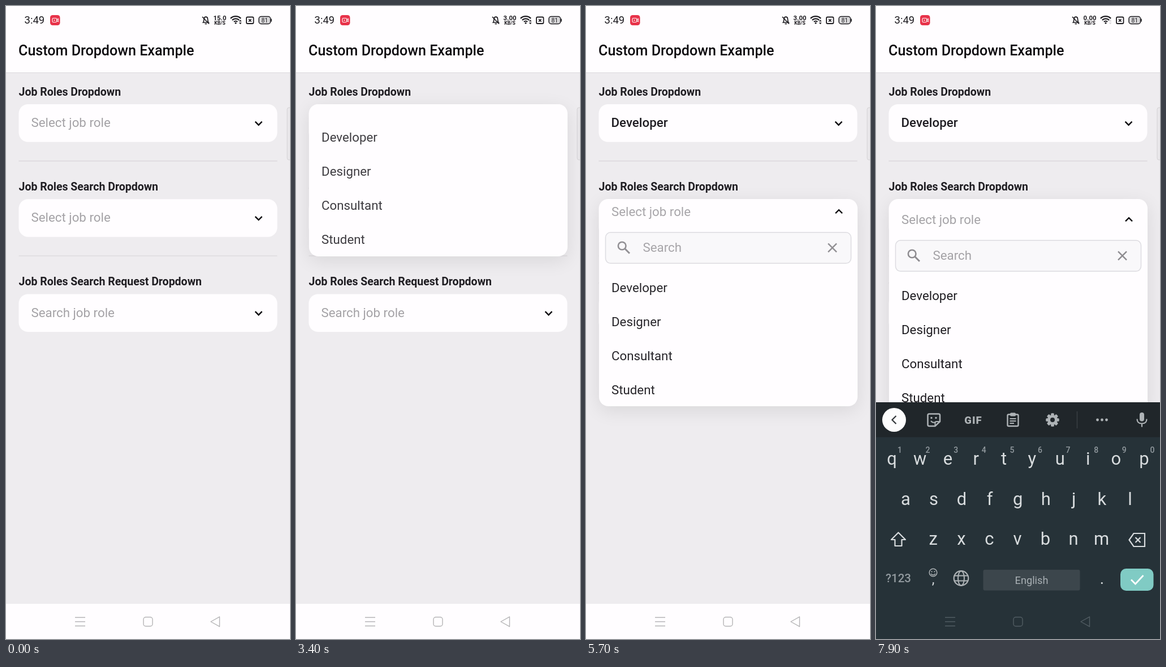
These frames come from a looping animation (502x1115 px, 8000 ms). An HTML page:

```html
<!DOCTYPE html>
<html lang="en">
<head>
<meta charset="utf-8">
<title>Custom Dropdown Example</title>
<style>
  html, body { margin: 0; width: 100%; height: 100%; overflow: hidden; background: #eeecef; }
  #stage { position: relative; width: 502px; height: 1115px; overflow: hidden; }
  svg { position: absolute; left: 0; top: 0; display: block; }
  text { font-family: Roboto, sans-serif; white-space: pre; }
  .panel {
    position: absolute; left: 22.5px; width: 457px; overflow: hidden;
    background: #fffdff; border-radius: 16.5px;
    box-shadow: 0 8px 33px rgba(0, 0, 0, .09);
  }
  .panel svg { top: auto; bottom: 0; }
</style>
</head>
<body>
<div id="stage"></div>
<script>
const LOOP = 8000;
const INK = '#1f1d22', HINT = '#a4a2a6', WHITE = '#fffdff', RULE = '#dbd9dc';
const ROLES = ['Developer', 'Designer', 'Consultant', 'Student'];

// Each opening: panel, start of opening, start of closing, chosen role
const OPENINGS = [
  { panel: 0, open: 70, close: 1850, pick: 1 },
  { panel: 0, open: 2393, close: 3330, pick: 2 },
  { panel: 0, open: 4063, close: 4930, pick: 0 },
  { panel: 1, open: 5436, close: Infinity },
];
const OPEN_TIME = 300;

const itemY = i => 275 + 60 * i;
// Touches: time, x, y
const TAPS = [
  [60, 67, 208], [1680, 67, itemY(1)], [2385, 67, 214], [3090, 67, itemY(2)],
  [4055, 67, 202], [4690, 67, itemY(0)], [5420, 67, 376], [7290, 160, 438],
];
const TAP_TIME = 205;

const clamp = v => Math.min(1, Math.max(0, v));
const smooth = p => p * p * (3 - 2 * p);

const text = (x, y, str, size, fill = INK, weight = 400, more = '') =>
  `<text x="${x}" y="${y}" font-size="${size}" fill="${fill}" font-weight="${weight}" ${more}>${str}</text>`;
const mid = (x, y, str, size, fill, weight, more = '') =>
  text(x, y, str, size, fill, weight, `text-anchor="middle" ${more}`);
const box = (x, y, w, h, r, fill, more = '') =>
  `<rect x="${x}" y="${y}" width="${w}" height="${h}" rx="${r}" fill="${fill}" ${more}/>`;
const line = (d, color, width, more = '') =>
  `<path d="${d}" fill="none" stroke="${color}" stroke-width="${width}" ${more}/>`;
const ring = (x, y, r, color, width, more = '') =>
  `<circle cx="${x}" cy="${y}" r="${r}" fill="none" stroke="${color}" stroke-width="${width}" ${more}/>`;
const dot = (x, y, r, fill) => `<circle cx="${x}" cy="${y}" r="${r}" fill="${fill}"/>`;
const svg = (body, view = '0 0 502 1115', w = 502, h = 1115) =>
  `<svg viewBox="${view}" width="${w}" height="${h}">${body}</svg>`;
const chevron = (y, dir) =>
  line(`M440.5 ${y - 3 * dir}l6 ${6 * dir}l6 ${-6 * dir}`, '#0c0a0e', 2.4);

function statusBar() {
  const c = '#1d1b20';
  const wifi = [4.5, 8.7, 12.9].map(r => {
    const k = r * .707;
    return line(`M${406 - k} ${31 - k}A${r} ${r} 0 0 1 ${406 + k} ${31 - k}`, c, 2.2);
  }).join('');
  return text(32.5, 31, '3:49', 18.5, c) +
    box(78, 16, 17.5, 18, 4.5, '#e8334a') +
    box(82, 21.5, 7.5, 7, 1.5, 'none', 'stroke="#fff" stroke-width="1.1"') +
    line('M89.5 24.2l2.8-1.7v5l-2.8-1.7', '#fff', 1.1) + dot(85.6, 25, 1, '#fff') +
    line('M348.5 29c1.5-1.5 1.2-4 1.5-6.500c.6-4.500 6-4.500 6.500 0c.2 2.500 0 5 1.500 6.500z', c, 1.7) +
    line('M351.500 31.500h3.500M347 19l12 12.500', c, 1.7) +
    mid(378, 25, '15.0', 11.4, c, 700, 'id="speed"') + mid(378, 33.2, 'KB/S', 8.6, c, 700) +
    wifi + dot(406, 30, 1.6, c) +
    `<path id="traffic" d="M411.800 27.300l2.400-3l2.400 3zM411.800 29.300l2.400 3l2.400-3z" fill="${c}"/>` +
    box(425, 19.5, 12.5, 11.5, 2, 'none', `stroke="${c}" stroke-width="1.8"`) +
    line('M429 23l4.600 4.600m0-4.600l-4.600 4.600', c, 1.7) +
    box(447, 18.5, 20.5, 13, 4, '#d9d8da', `stroke="${c}" stroke-width="1.500"`) +
    line('M469 22.500v5', c, 1.6) + mid(457.2, 28.7, '81', 10.3, c);
}

function field(top, label, hint, id) {
  return text(22.5, top - 15.5, label, 19.5, INK, 600) +
    box(22.5, top, 457, 66.5, 16.5, WHITE) +
    text(44.5, top + 40, hint, 22.3, HINT, 400, `id="${id}"`) + chevron(top + 33.7, 1);
}

const navIcons = color => `<g fill="none" stroke="${color}" stroke-width="1.4" stroke-linejoin="round">
  <path d="M122 1077h18m-18 7.500h18m-18 7.500h18"/>
  <rect x="243" y="1076.500" width="16" height="16" rx="4"/>
  <path d="M362 1084.500l15.500-8.700v17.400z"/></g>`;

const page = svg(
  box(0, 0, 502, 1115, 0, '#eeecef') + box(0, 0, 502, 117, 0, WHITE) +
  line('M0 117.5h502', RULE, 1.2) + statusBar() +
  text(22, 87, 'Custom Dropdown Example', 25.1, '#0c0a0e', 500) +
  field(173, 'Job Roles Dropdown', 'Select job role', 'value') +
  line('M22.5 273h457', RULE, 1.3) +
  field(340.2, 'Job Roles Search Dropdown', 'Select job role', 'value2') +
  line('M22.5 440.2h457', RULE, 1.3) +
  field(507.5, 'Job Roles Search Request Dropdown', 'Search job role', 'value3') +
  box(497, 179, 12, 92, 3, '#e9e7ea', 'stroke="#d3d1d4"') +
  box(0, 1053, 502, 62, 0, WHITE) + navIcons('#b5b4b6'));

const roleList = first =>
  ROLES.map((r, i) => text(44.5, first + 60 * i, r, 22.3)).join('');

const PANELS = [
  { top: 173, height: 312, body:
    text(44.5, 217, 'Select job role', 22.3, HINT, 400, 'id="head"') +
    chevron(209, -1) + roleList(283) },
  { top: 340.2, height: 378.8, body:
    text(44.5, 384, 'Select job role', 22.3, HINT) + chevron(376.3, -1) +
    box(34, 413, 434, 54.5, 9, '#f9f8fa', 'stroke="#dcdbe0" stroke-width="1.500"') +
    ring(63.2, 436.7, 6.8, '#8e8c90', 2.6) + line('M68 441.500l8.500 8.500', '#8e8c90', 3) +
    text(100, 447, 'Search', 22.3, HINT) +
    line('M427.500 432.500l15 15m0-15l-15 15', '#8e8c90', 2.4) +
    box(100, 428, 2.8, 22.5, 1.2, '#2196f3', 'id="caret"') + roleList(518) },
];

function keyboard() {
  const icon = '#aeb3b6', key = '#d8dcde', dim = '#929a9f';
  const row = (keys, x, y) =>
    [...keys].map((k, i) => mid(x + 49.55 * i, y, k, 31, key)).join('');
  const digits = [...'1234567890']
    .map((d, i) => mid(42 + 49.6 * i, 786.500, d, 14, dim, 500)).join('');
  const teeth = [0, 45, 90, 135]
    .map(a => box(309.2, 717.3, 5.6, 23.4, 1.5, icon, `transform="rotate(${a} 312 729)"`)).join('');
  return box(0, 698, 502, 62, 0, '#20262a') + box(0, 759.5, 502, 560, 0, '#263238') +
    dot(32, 729, 21, '#fdfdfd') + line('M35.500 722l-7 7l7 7', '#33383b', 2.2) +
    // sticker
    line('M94 718.500h16.500q2.500 0 2.500 2.500v11l-8.500 8h-10.500q-2.500 0-2.500-2.500v-16.500q0-2.500 2.500-2.500z', icon, 2.5) +
    line('M104.500 740v-5.500q0-2.500 2.500-2.500h6M97 731q4.500 5 9 1', icon, 2) +
    dot(98, 725.5, 1.7, icon) + dot(106, 725.5, 1.7, icon) +
    mid(172, 735.500, 'GIF', 18.5, icon, 900, 'letter-spacing="1"') +
    // clipboard
    box(232.5, 719.5, 19, 20.5, 2, 'none', `stroke="${icon}" stroke-width="2.400"`) +
    box(237, 716.5, 10, 6, 2, icon) +
    line('M236.500 727h11m-11 4h11m-11 4h7.500', icon, 2) +
    teeth + dot(312, 729, 8.8, icon) + dot(312, 729, 4, '#20262a') +
    line('M355.500 714v30', '#3b4145', 1.4) +
    [391.5, 399.5, 407.5].map(x => dot(x, 729, 2.4, icon)).join('') +
    // microphone
    box(466, 716, 8, 15.5, 4, icon) +
    line('M461.500 727.500q0 8 8.500 8t8.500-8M470 735.500v6', icon, 2.2) +
    row('qwertyuiop', 28, 808) + digits +
    row('asdfghjkl', 52.5, 878.5) + row('zxcvbnm', 101.3, 949) +
    line('M39.500 927.500l12.500 12.500h-6.500v11h-12v-11h-6.500z', key, 2.2, 'stroke-linejoin="round"') +
    line('M447.500 940.500l8-11.500h19.500v23h-19.500zM458.500 936l9 9m0-9l-9 9', key, 2.2) +
    mid(39.5, 1015, '?123', 20.6, dim, 500) +
    ring(101, 998, 6.8, icon, 1.5) + dot(98.5, 996.3, 1.1, icon) + dot(103.5, 996.3, 1.1, icon) +
    line('M97 1000q4 4.500 8 0', icon, 1.5) +
    mid(101, 1018, ',', 24, key) +
    ring(150.5, 1008, 12.8, icon, 2.2) +
    `<ellipse cx="150.500" cy="1008" rx="5.500" ry="12.800" fill="none" stroke="${icon}" stroke-width="2"/>` +
    line('M138.500 1003.500h24m-24 9h24', icon, 2) +
    box(189.5, 993, 171, 36.5, 3, '#3c464c') +
    mid(275, 1017.500, 'English', 18.2, '#a9b0b4') + mid(399.5, 1018, '.', 28, key) +
    box(432, 991, 58.5, 39, 10, '#80cbc4') +
    line('M451 1010.500l7.500 7.500l14-15', '#fff', 2.8);
}

const stage = document.getElementById('stage');
stage.innerHTML = page +
  PANELS.map(p => `<div class="panel" style="top:${p.top}px">` +
    svg(p.body, `22.5 ${p.top} 457 ${p.height}`, 457, p.height) + '</div>').join('') +
  svg(`<g id="keys">${keyboard()}</g><g id="darkNav">${navIcons('#525d63')}</g>` +
    ring(0, 0, 15.7, '#dbe1eb', 2.4, 'id="touch"'));

const $ = id => document.getElementById(id);
const panels = [...stage.querySelectorAll('.panel')];
const show = (el, on) => { el.style.visibility = on ? 'visible' : 'hidden'; };

function openness(panel, t) {
  let best = 0;
  for (const o of OPENINGS) {
    if (o.panel !== panel || t < o.open) continue;
    const p = Math.min(clamp((t - o.open) / OPEN_TIME), 1 - clamp((t - o.close) / OPEN_TIME));
    best = Math.max(best, smooth(p));
  }
  return best;
}

function setValue(el, role) {
  el.textContent = role || 'Select job role';
  el.setAttribute('fill', role ? INK : HINT);
  el.setAttribute('font-weight', role ? 500 : 400);
}

function render(t) {
  panels.forEach((el, i) => {
    const f = openness(i, t);
    el.style.display = f > 0 ? 'block' : 'none';
    el.style.height = PANELS[i].height * f + 'px';
    el.firstChild.style.opacity = f;
  });

  const last = OPENINGS.filter(o => t >= o.close).pop();
  const role = last && ROLES[last.pick];
  setValue($('value'), role);
  setValue($('head'), role);

  $('speed').textContent = t < 1200 ? '15.0' : t < 6200 ? '3.00' : '0.00';
  $('traffic').setAttribute('opacity', t < 6400 ? 1 : .18);
  show($('caret'), t >= 7380 && t < 7880);

  const tap = TAPS.find(([at]) => t >= at && t < at + TAP_TIME);
  show($('touch'), tap);
  if (tap) $('touch').setAttribute('transform', `translate(${tap[1]} ${tap[2]})`);

  const k = 1 - (1 - clamp((t - 7440) / 350)) ** 2;
  $('keys').setAttribute('opacity', k);
  $('keys').setAttribute('transform', `translate(0 ${150 * (1 - k)})`);
  $('darkNav').setAttribute('opacity', k);
}

const start = performance.now();
function tick() {
  render((performance.now() - start) % LOOP);
  requestAnimationFrame(tick);
}
tick();
</script>
</body>
</html>
```
